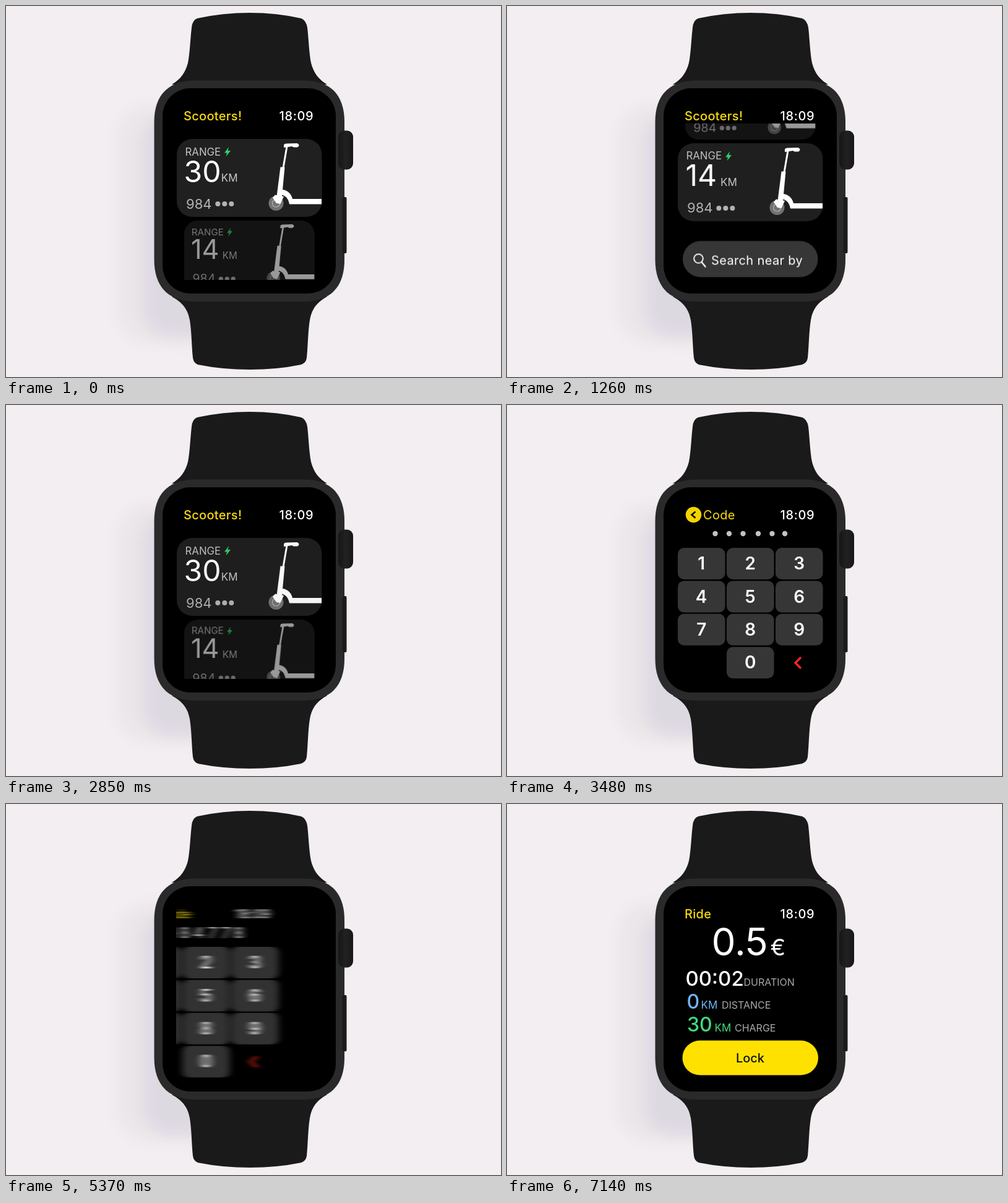
Write an HTML page that moves like this. It is 800 px wide and 600 px high and loops after 8000 ms.

```html
<!DOCTYPE html>
<html lang="en">
<head>
<meta charset="utf-8">
<title>Scooter watch app</title>
<style>
  html, body { margin: 0; width: 100%; height: 100%; overflow: hidden; background: #f3eef2; }
  svg { display: block; width: 100vw; height: 100vh; }
  text { font-family: Inter, Roboto, sans-serif; font-size: 20px; fill: #fff; white-space: pre; }
  .title { fill: #fadb0c; font-weight: 500; letter-spacing: .3px; }
  .time { font-weight: 500; letter-spacing: .65px; }
  .label { font-size: 16px; fill: #a8a8ab; }
  .range { font-size: 16.8px; fill: #c4c4c6; }
  .num { font-size: 48px; }
  .unit { font-size: 17px; fill: #c8c8ca; }
  .code { font-size: 22px; fill: #b4b4b6; }
  .key { font-size: 28px; font-weight: 600; text-anchor: middle; }
  .digit { font-size: 24px; font-weight: 500; text-anchor: middle; fill: #e4e4e4; }
  .stat { font-size: 32px; font-weight: 500; }
  .clock { font-size: 33px; font-weight: 500; }
  .price { font-size: 62px; }
  .euro { font-size: 37px; }

  /* every cycle lasts 8 s: 1% = 80 ms */
  .list { animation: listSlide 8s infinite, listBlur 8s step-end infinite; }
  .pad  { animation: padSlide 8s infinite, padBlur 8s step-end infinite; }
  .ride { animation: rideSlide 8s infinite, rideBlur 8s step-end infinite; }
  .scroll { animation: scroll 8s infinite; }
  .tap { animation: tap 8s ease-in-out infinite; }
  .card { transform-origin: 393px 278px; animation: focus 8s infinite; }
  .first  { --s0: 1; --o0: 1; --s1: .9; --o1: .6; }
  .second { --s0: .9; --o0: .6; --s1: 1; --o1: 1; }
  .swap { animation: swap 8s linear both infinite; }
  .sec0 { animation: sec0 8s step-end infinite; }
  .sec1 { animation: sec1 8s step-end infinite; }
  .sec2 { animation: sec2 8s step-end infinite; }

  @keyframes scroll {
    0% { transform: translateY(0); }
    6.375% { transform: translateY(0); animation-timing-function: cubic-bezier(.65, 0, .35, 1); }
    15.75% { transform: translateY(-118.5px); }
    22.3% { transform: translateY(-118.5px); animation-timing-function: cubic-bezier(.65, 0, .35, 1); }
    27.375%, 100% { transform: translateY(0); }
  }
  @keyframes focus {
    0% { transform: scale(var(--s0)); opacity: var(--o0); }
    6.375% { transform: scale(var(--s0)); opacity: var(--o0); animation-timing-function: ease-in-out; }
    15.9% { transform: scale(var(--s1)); opacity: var(--o1); }
    16.25% { transform: scale(var(--s1)); opacity: var(--o1); animation-timing-function: cubic-bezier(.33, 0, .67, .33); }
    27.375%, 100% { transform: scale(var(--s0)); opacity: var(--o0); }
  }
  @keyframes tap {
    0%, 35.25% { opacity: 1; }
    37.125% { opacity: .6; }
    39%, 100% { opacity: 1; }
  }
  @keyframes listSlide {
    0% { transform: none; opacity: 1; }
    40.75% { transform: translateX(0); opacity: 1; animation-timing-function: cubic-bezier(.33, 0, .67, .33); }
    42.2%, 100% { transform: translateX(-190px); opacity: 0; }
  }
  @keyframes padSlide {
    0% { transform: translateX(190px); opacity: 0; }
    42.2% { transform: translateX(190px); opacity: 0; animation-timing-function: ease-out; }
    43.4% { transform: translateX(0); opacity: 1; }
    66% { transform: translateX(0); opacity: 1; animation-timing-function: cubic-bezier(.33, 0, .67, .33); }
    67.125% { transform: translateX(-68px); opacity: .95; animation-timing-function: linear; }
    67.875%, 100% { transform: translateX(-190px); opacity: 0; }
  }
  @keyframes rideSlide {
    0% { transform: translateX(190px); opacity: 0; }
    67.875% { transform: translateX(190px); opacity: 0; animation-timing-function: ease-out; }
    69.75%, 100% { transform: translateX(0); opacity: 1; }
  }
  @keyframes listBlur {
    0% { filter: none; }
    41.1% { filter: url(#soft); }
    41.6% { filter: url(#smear); }
    42.3%, 100% { filter: none; }
  }
  @keyframes padBlur {
    0% { filter: none; }
    42.1% { filter: url(#smear); }
    42.8% { filter: url(#soft); }
    43.2% { filter: none; }
    66.3% { filter: url(#soft); }
    66.9% { filter: url(#smear); }
    68%, 100% { filter: none; }
  }
  @keyframes rideBlur {
    0% { filter: none; }
    67.8% { filter: url(#smear); }
    68.6% { filter: url(#soft); }
    69.3%, 100% { filter: none; }
  }
  @keyframes swap {
    0% { opacity: var(--a); }
    2.25%, 50% { opacity: var(--b); }
    50.01%, 100% { opacity: var(--a); }
  }
  @keyframes sec0 { 0% { opacity: 1; } 78%, 100% { opacity: 0; } }
  @keyframes sec1 { 0% { opacity: 0; } 78% { opacity: 1; } 89.25%, 100% { opacity: 0; } }
  @keyframes sec2 { 0% { opacity: 0; } 89.25%, 100% { opacity: 1; } }
</style>
</head>
<body>
<svg viewBox="0 0 800 600">
  <defs>
    <filter id="shadow" filterUnits="userSpaceOnUse" x="80" y="80" width="520" height="540">
      <feGaussianBlur stdDeviation="12"/>
    </filter>
    <filter id="smear" filterUnits="userSpaceOnUse" x="220" y="150" width="350" height="310" color-interpolation-filters="sRGB">
      <feGaussianBlur stdDeviation="6 0"/>
    </filter>
    <filter id="soft" filterUnits="userSpaceOnUse" x="220" y="150" width="350" height="310" color-interpolation-filters="sRGB">
      <feGaussianBlur stdDeviation="2.5 0"/>
    </filter>
    <clipPath id="stage"><rect x="275.5" y="160" width="235" height="282.5"/></clipPath>
    <clipPath id="view"><rect x="275.5" y="190" width="235" height="252.5"/></clipPath>
    <linearGradient id="crown">
      <stop offset="0" stop-color="#161616"/>
      <stop offset=".5" stop-color="#212121"/>
      <stop offset="1" stop-color="#171717"/>
    </linearGradient>

    <g id="scooter">
      <circle cx="436.5" cy="319" r="12" fill="#737375"/>
      <circle cx="436.5" cy="319" r="6" fill="none" stroke="#b2b2b4" stroke-width="1.2"/>
      <g fill="#fff">
        <path d="M449 224.500Q450 222.500 453 222.500L470 222Q473.500 223 473.500 225.500Q473 228 470 228.500L465 228.500L462 227L456 228L449 229Z"/>
        <path d="M452.500 227H455.500L449.500 262H446.500Z"/>
        <path d="M443.500 260.500H450.500L446 308H437.500Z"/>
        <path d="M431 310L435 305.500L449 308L443.500 320L437 319Z"/>
        <path d="M444 296.500C454 297 461 303 463 312H510V320.500H458C456.500 312 452 305.500 443 305Z"/>
      </g>
    </g>
    <g id="body">
      <rect x="276" y="215" width="234.500" height="126" rx="25" fill="#202021"/>
      <text class="range" x="289.500" y="241.500">RANGE</text>
      <path d="M360 228L353 237.500H357L355.500 243.500L363 234H358.500Z" fill="#34d068"/>
      <text class="code" x="291" y="327.500">984</text>
      <g fill="#b4b4b6">
        <circle cx="342.300" cy="320" r="4"/><circle cx="353.300" cy="320" r="4"/><circle cx="364.300" cy="320" r="4"/>
      </g>
      <use href="#scooter"/>
    </g>
  </defs>

  <rect width="800" height="600" fill="#f3eef2"/>
  <g fill="#282030" filter="url(#shadow)">
    <rect x="181" y="162" width="290" height="382" rx="48" opacity=".035"/>
    <rect x="222" y="175" width="250" height="362" rx="48" opacity=".06"/>
  </g>

  <g fill="#1a1a1b">
    <path d="M268 127C283 118 290 107 294 92C297 78 298 52 300 35Q301 23 309 20Q350 11 394 11Q438 11 477 20Q485 23 487 35C489 52 490 78 493 92C497 107 504 118 519 127Z"/>
    <path d="M268 470C286 480 294 491 297 508C300 526 300 550 302 569Q303 577 310 580Q350 588 394 588Q438 588 477 580Q485 577 486 569C488 550 488 526 491 508C494 491 501 480 519 470Z"/>
  </g>
  <rect x="542" y="309" width="8.500" height="91" rx="2" fill="#1b1b1c"/>
  <path d="M239.500 188C239.500 144 262 120.500 306 120.500H481C525 120.500 547 144 547 188V410C547 454 525 478 481 478H306C262 478 239.500 454 239.500 410Z" fill="#2a2a2b"/>
  <path d="M543.500 310H547V399H543.500Z" fill="#1b1b1c"/>
  <rect x="537" y="201.500" width="24" height="63" rx="10" fill="url(#crown)"/>
  <rect x="253" y="133" width="280" height="332" rx="45" fill="#000"/>

  <g clip-path="url(#stage)">
    <g class="list">
      <text class="title" x="287" y="185">Scooters!</text>
      <text class="time" x="441.500" y="185">18:09</text>
      <g clip-path="url(#view)">
        <g class="scroll">
          <g class="tap">
            <g class="card first">
              <use href="#body"/>
              <text class="num" x="287.500" y="285">30</text>
              <text class="unit" x="347.800" y="284">KM</text>
            </g>
          </g>
          <g transform="translate(0 125.500)">
            <g class="card second">
              <use href="#body"/>
              <text class="num" x="288.500" y="284.500">14</text>
              <text class="unit" x="345" y="284">KM</text>
            </g>
          </g>
          <g transform="translate(0 118.500)">
            <rect x="284" y="380" width="218.500" height="58.500" rx="29.250" fill="#363637"/>
            <circle cx="309.500" cy="408.500" r="7.300" fill="none" stroke="#f2f2f2" stroke-width="2"/>
            <path d="M314.500 414L320.500 421.500" stroke="#f2f2f2" stroke-width="2.400" stroke-linecap="round"/>
            <text x="330" y="418" fill="#f2f2f2" letter-spacing=".36">Search near by</text>
          </g>
        </g>
      </g>
    </g>

    <g class="pad" id="pad">
      <circle cx="301.500" cy="177.500" r="12.700" fill="#f2d500"/>
      <path d="M304.500 172.500L298.500 177.500L304.500 182.800" fill="none" stroke="#000" stroke-width="2.500"/>
      <text class="title" x="317" y="185" style="font-weight:400">Code</text>
      <text class="time" x="441.500" y="185">18:09</text>
      <path d="M475 408L466 417L475 426" fill="none" stroke="#f5281c" stroke-width="3.400"/>
    </g>

    <g class="ride">
      <text class="title" x="287" y="185">Ride</text>
      <text class="time" x="441.500" y="185">18:09</text>
      <text class="price" x="330.500" y="245">0.5</text>
      <text class="euro" x="425.500" y="245">€</text>
      <text class="clock sec0" x="288.500" y="294">00:00</text>
      <text class="clock sec1" x="288.500" y="294">00:01</text>
      <text class="clock sec2" x="288.500" y="294">00:02</text>
      <text class="label" x="382.500" y="293.500">DURATION</text>
      <text class="stat" x="290.500" y="331" style="fill:#70b4f2">0</text>
      <text class="unit" x="313.500" y="330.500" style="fill:#70b4f2">KM</text>
      <text class="label" x="347" y="330.500">DISTANCE</text>
      <text class="stat" x="291" y="367.500" style="fill:#40da7c">30</text>
      <text class="unit" x="335.500" y="367.500" style="fill:#40da7c">KM</text>
      <text class="label" x="368" y="367.500">CHARGE</text>
      <rect x="283.500" y="382.500" width="219.500" height="56" rx="28" fill="#ffe100"/>
      <text x="393" y="418" text-anchor="middle" style="fill:#111;font-weight:500">Lock</text>
    </g>
  </g>
</svg>
<script>
  const pad = document.getElementById('pad');

  function add(tag, attrs, text = '') {
    const el = document.createElementNS('http://www.w3.org/2000/svg', tag);
    for (const name in attrs) el.setAttribute(name, attrs[name]);
    el.textContent = text;
    pad.append(el);
  }

  for (let n = 0; n < 10; n++) {
    const col = n ? (n - 1) % 3 : 1;
    const row = n ? Math.floor((n - 1) / 3) : 3;
    const x = 276 + col * 79, y = 231 + row * 53.4;
    add('rect', { x, y, width: 76.5, height: 51, rx: 10, fill: '#363637' });
    add('text', { class: 'key', x: x + 38.2, y: y + 35.2 }, n);
  }

  // each dot fades into its digit
  const dots = [336.5, 359, 381.5, 406, 428.5, 449];
  const centers = [336, 359, 381, 404, 425.5, 446];
  const starts = [3600, 3840, 4080, 4290, 4470, 4650];
  [...'984778'].forEach((digit, i) => {
    const style = (a, b) => `--a:${a};--b:${b};animation-delay:${starts[i]}ms`;
    add('circle', { class: 'swap', cx: dots[i], cy: 208, r: 4.2, fill: '#c2c2c2', style: style(1, 0) });
    add('text', { class: 'swap digit', x: centers[i], y: 216.5, style: style(0, 1) }, digit);
  });
</script>
</body>
</html>
```
